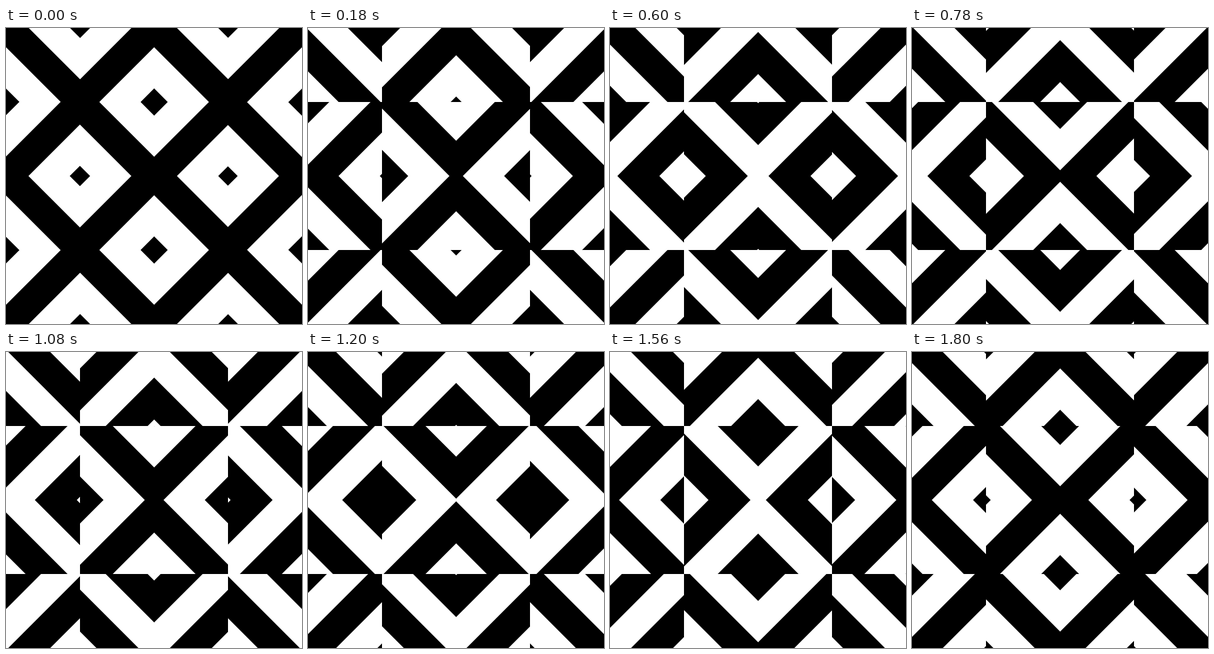
An HTML page with a canvas that plays this animation: 500x500 px, repeating every 1.86 s.

```html
<!DOCTYPE html>
<html lang="en">
<head>
<meta charset="utf-8">
<title>Sliding stripes</title>
<style>
  html, body { margin: 0; width: 100%; height: 100%; overflow: hidden; background: #fff; }
  canvas { display: block; width: 500px; height: 500px; }
</style>
</head>
<body>
<canvas id="stage" width="500" height="500"></canvas>
<script>
const ctx = document.getElementById('stage').getContext('2d');
const LOOP = 1860, STEP = 60;
const CELL = 125;
const PERIOD = 140.6;   // distance between stripes, measured along x
const BLACK = 70.9;     // width of a black stripe along x

// One quadrant: lean 1 follows x + y, lean -1 follows x - y.
// start: middle of a black stripe, speed: periods per loop, nudge: shift in the right half.
const cells = [
  { x: 0,    y: 0,    lean: -1, start: 3,     speed: -3, nudge: 0 },
  { x: CELL, y: 0,    lean: 1,  start: 247.2, speed: 1,  nudge: -0.5 },
  { x: 0,    y: CELL, lean: 1,  start: 252.5, speed: 1,  nudge: 1 },
  { x: CELL, y: CELL, lean: -1, start: -2.8,  speed: 2,  nudge: -0.5 }
];

const mod = (a, n) => ((a % n) + n) % n;

function drawCell(cell, phase, right) {
  const { x, y, lean } = cell;
  const shift = cell.start + cell.speed * phase * PERIOD + (right ? cell.nudge : 0);
  const half = BLACK / 2;
  const top = lean * y, bottom = lean * (y + CELL);

  ctx.save();
  ctx.beginPath();
  ctx.rect(x, y, CELL, CELL);
  ctx.clip();
  ctx.beginPath();
  for (let k = -3; k <= 4; k++) {
    const mid = mod(shift, PERIOD) + k * PERIOD;
    ctx.moveTo(mid - half - top, y);
    ctx.lineTo(mid + half - top, y);
    ctx.lineTo(mid + half - bottom, y + CELL);
    ctx.lineTo(mid - half - bottom, y + CELL);
    ctx.closePath();
  }
  ctx.fill();
  ctx.restore();
}

function draw(time) {
  const phase = Math.floor((time % LOOP) / STEP) * STEP / LOOP;
  ctx.setTransform(1, 0, 0, 1, 0, 0);
  ctx.fillStyle = '#fff';
  ctx.fillRect(0, 0, 500, 500);
  ctx.fillStyle = '#000';
  for (const right of [false, true]) {
    for (const low of [false, true]) {
      ctx.setTransform(right ? -1 : 1, 0, 0, low ? -1 : 1, right ? 500 : 0, low ? 500 : 0);
      for (const cell of cells) drawCell(cell, phase, right);
    }
  }
}

const begin = performance.now();
function tick() {
  draw(performance.now() - begin);
  requestAnimationFrame(tick);
}
tick();
</script>
</body>
</html>
```
